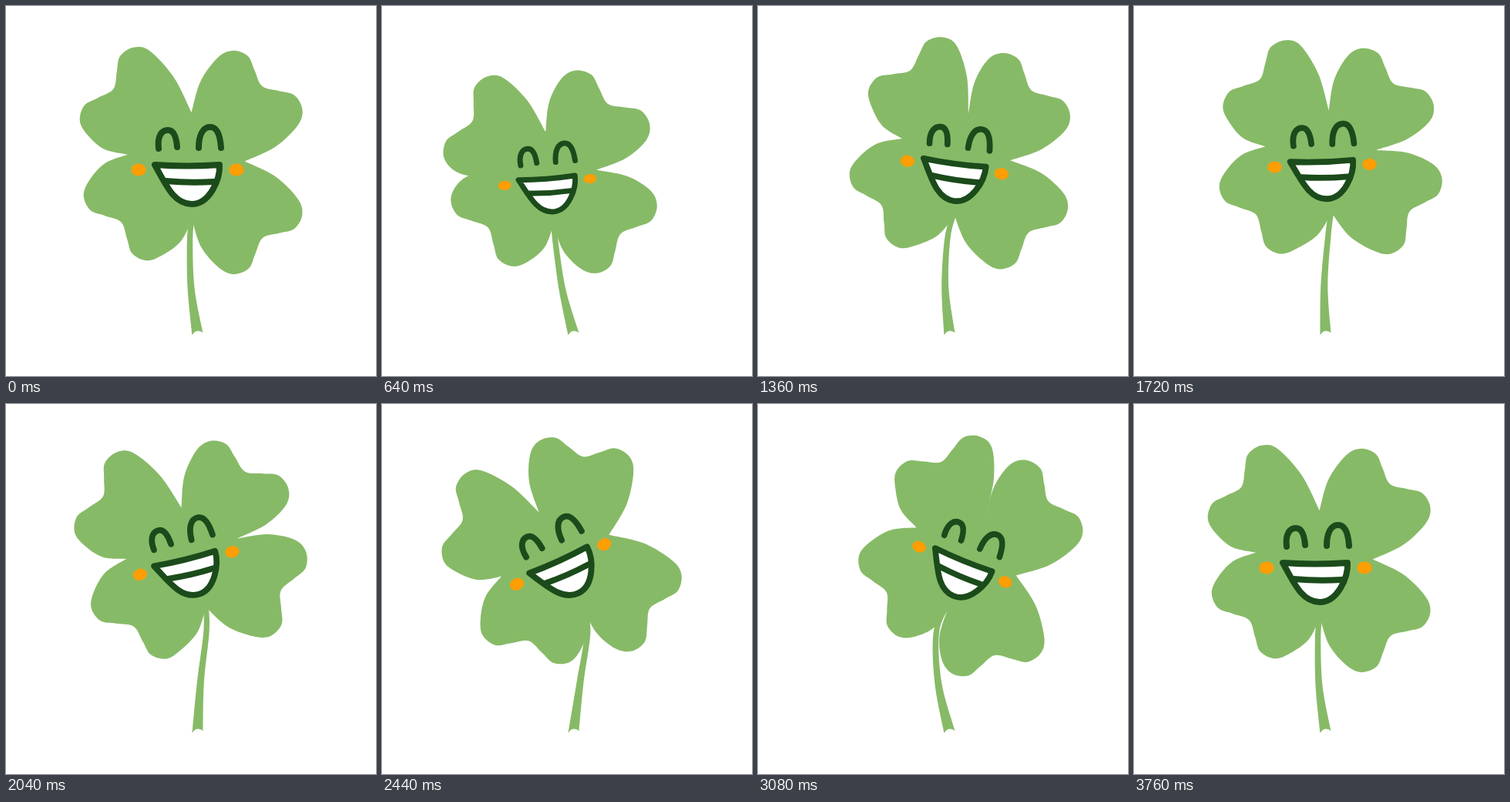
An HTML page with a canvas that plays this animation: 480x480 px, repeating every 3840 ms.

```html
<!DOCTYPE html>
<html lang="en">
<head>
<meta charset="utf-8">
<title>Swaying clover</title>
<style>
html, body { margin: 0; width: 100%; height: 100%; overflow: hidden; background: #fff; }
canvas { display: block; }
</style>
</head>
<body>
<canvas id="stage" width="480" height="480"></canvas>
<script>
const ctx = document.getElementById('stage').getContext('2d');
const GREEN = '#87ba67', DARK = '#1b4b1b', ORANGE = '#fd9e04';
const LOOP = 3840, STEP = 40, PERIOD = 3760;
const LOBE = 27, LOBE_GAP = 39.5, BULGE = 7;

// Clockwise from top right; the gap comes before its leaf.
const leaves = [
  { angle: -48, reach: 136, skew: -2, gapReach: 74, gapSkew: 4 },
  { angle: 42, reach: 123, skew: 7, gapReach: 75, gapSkew: -5 },
  { angle: 142, reach: 101, skew: -6, gapReach: 65, gapSkew: -7 },
  { angle: 228, reach: 133, skew: -12, gapReach: 80, gapSkew: 9 }
];

// Head x, y and size, then the turn of each leaf in degrees.
const rest = [235.5, 212, 1, 0, 0, 0, 0];
const left = [214.5, 228, 0.875, -4, -7, 1, -8];
const right = [255, 209, 0.97, 3, -1, 11, 18];
const turned = [233.5, 206, 0.97, -9, -26, -12, -8.5];
const tiltLeft = [231.5, 207.5, 0.98, -30, -16, -29, -23];
const tiltRight = [265, 207.5, 0.95, 12, 28, 18, 31];
const beyond = (pose, k) => pose.map((v, i) => rest[i] + (v - rest[i]) * k);

const keys = [
  [0, rest], [514, beyond(left, 1.7)], [640, left], [1360, right], [2040, turned],
  [2440, tiltLeft], [2520, beyond(tiltLeft, 1.13)],
  [3080, tiltRight], [3210, beyond(tiltRight, 1.27)]
];

function keyAt(i) {
  const n = keys.length, turn = Math.floor(i / n);
  const [time, values] = keys[i - turn * n];
  return { time: time + turn * PERIOD, values };
}

// Monotone cubic interpolation: eases at every extreme, never overshoots.
function poseAt(t) {
  let i = keys.length - 1;
  while (keys[i][0] > t) i--;
  const [a, b, c, d] = [i - 1, i, i + 1, i + 2].map(keyAt);
  const h0 = b.time - a.time, h1 = c.time - b.time, h2 = d.time - c.time;
  const s = (t - b.time) / h1;
  const slope = (m, n, hm, hn) => m * n <= 0 ? 0 :
    3 * (hm + hn) / ((2 * hn + hm) / m + (hn + 2 * hm) / n);
  return b.values.map((p, j) => {
    const q = c.values[j], m = (q - p) / h1;
    const v0 = slope((p - a.values[j]) / h0, m, h0, h1) * h1;
    const v1 = slope(m, (d.values[j] - q) / h2, h1, h2) * h1;
    return p + s * (v0 + s * (3 * (q - p) - 2 * v0 - v1 + s * (v0 + v1 - 2 * (q - p))));
  });
}

const rad = degrees => degrees * Math.PI / 180;
const polar = ([x, y], degrees, r) => [x + r * Math.cos(rad(degrees)), y + r * Math.sin(rad(degrees))];
const mix = (p, q, k) => p.map((v, i) => v + (q[i] - v) * k);

// Smooth curve continuing from the first point.
function curve(pts) {
  for (let i = 0; i < pts.length - 1; i++) {
    const p = pts[i], q = pts[i + 1], before = pts[i - 1] || p, after = pts[i + 2] || q;
    ctx.bezierCurveTo(
      p[0] + (q[0] - before[0]) / 6, p[1] + (q[1] - before[1]) / 6,
      q[0] - (after[0] - p[0]) / 6, q[1] - (after[1] - p[1]) / 6, q[0], q[1]);
  }
}

// Each gap lies between the directions of its two neighbouring leaves.
function gapsOf(hub, size, turns) {
  return leaves.map((leaf, i) => {
    const j = (i + 3) % 4;
    const before = leaves[j].angle + turns[j] - (i ? 0 : 360);
    const middle = (before + leaf.angle + turns[i]) / 2;
    return polar(hub, middle + leaf.gapSkew, leaf.gapReach * size);
  });
}

// Half a leaf, from its gap over one lobe; side is -1 or 1.
function halfLeaf(gap, middle, facing, side) {
  const lobe = polar(middle, facing + 90 * side, LOBE_GAP);
  const arc = [90, 45, 0, -45].map(a => polar(lobe, facing + a * side, LOBE + a / 60));
  const flank = polar(mix(gap, arc[0], 0.5), facing + 90 * side, BULGE);
  return [gap, flank, ...arc];
}

function drawLeaves(hub, size, turns, gaps) {
  ctx.beginPath();
  ctx.moveTo(...gaps[0]);
  leaves.forEach(({ angle, reach, skew }, i) => {
    const heading = angle + turns[i], facing = heading + skew;
    const middle = polar(hub, heading, reach * size);
    curve([
      ...halfLeaf(gaps[i], middle, facing, -1),
      polar(middle, facing, 9),
      ...halfLeaf(gaps[(i + 1) % 4], middle, facing, 1).reverse()
    ]);
  });
  ctx.closePath();
  ctx.fill();
}

// The stem leaves the head along its tilt and stays rooted at the foot.
function drawStem(top, tilt) {
  const foot = [248.5, 425.5];
  const shift = ([x, y], dx, dy = 0) => [x + dx, y + dy];
  const upper = shift(mix(top, foot, 0.19), -4 - tilt / 2);
  const lower = shift(mix(top, foot, 0.6), -5.5 - tilt * 0.37);
  const edge = side => [
    shift(top, side * 3.5, -5), shift(upper, side * 3.7),
    shift(lower, side * 4.5), shift(foot, side * 7, -side * 1.5)
  ];
  const rightEdge = edge(1).reverse();
  ctx.beginPath();
  ctx.moveTo(top[0] - 3.5, top[1] - 5);
  curve(edge(-1));
  ctx.quadraticCurveTo(247, 418, ...rightEdge[0]);
  curve(rightEdge);
  ctx.closePath();
  ctx.fill();
}

const eyes = new Path2D(
  'M198 185C196 169 202 161 210 161C218 161 221 171 222 183' +
  'M250 184C250 168 255 157 265 157C275 157 278 170 279 184');
const mouth = new Path2D(
  'M193 206Q235 209 277 206C278 225 264 257 241 257C218 257 208 233 193 206Z');
const teeth = new Path2D('M207 227Q238 230 269 228');

function drawFace(hub, size, tilt) {
  ctx.save();
  ctx.translate(...hub);
  ctx.rotate(rad(tilt));
  ctx.scale(size, size);
  ctx.translate(-rest[0], -rest[1]);
  ctx.fillStyle = ORANGE;
  for (const x of [172, 299]) {
    ctx.beginPath();
    ctx.ellipse(x, 212.5, 9.6, 8 * size, 0, 0, 2 * Math.PI);
    ctx.fill();
  }
  ctx.strokeStyle = DARK;
  ctx.lineCap = ctx.lineJoin = 'round';
  ctx.lineWidth = 8;
  ctx.fillStyle = '#fff';
  ctx.fill(mouth);
  for (const line of [eyes, teeth, mouth]) ctx.stroke(line);
  ctx.restore();
}

function frame() {
  const clock = performance.now() % LOOP;
  const t = Math.min(Math.floor(clock / STEP) * STEP, PERIOD) % PERIOD;
  const [x, y, size, ...turns] = poseAt(t);
  const hub = [x, y];
  const tilt = turns.reduce((sum, turn) => sum + turn) / 4;
  const gaps = gapsOf(hub, size, turns);
  ctx.fillStyle = '#fff';
  ctx.fillRect(0, 0, 480, 480);
  ctx.fillStyle = GREEN;
  drawStem(gaps[2], tilt);
  drawLeaves(hub, size, turns, gaps);
  drawFace(hub, size, tilt);
  requestAnimationFrame(frame);
}
frame();
</script>
</body>
</html>
```
